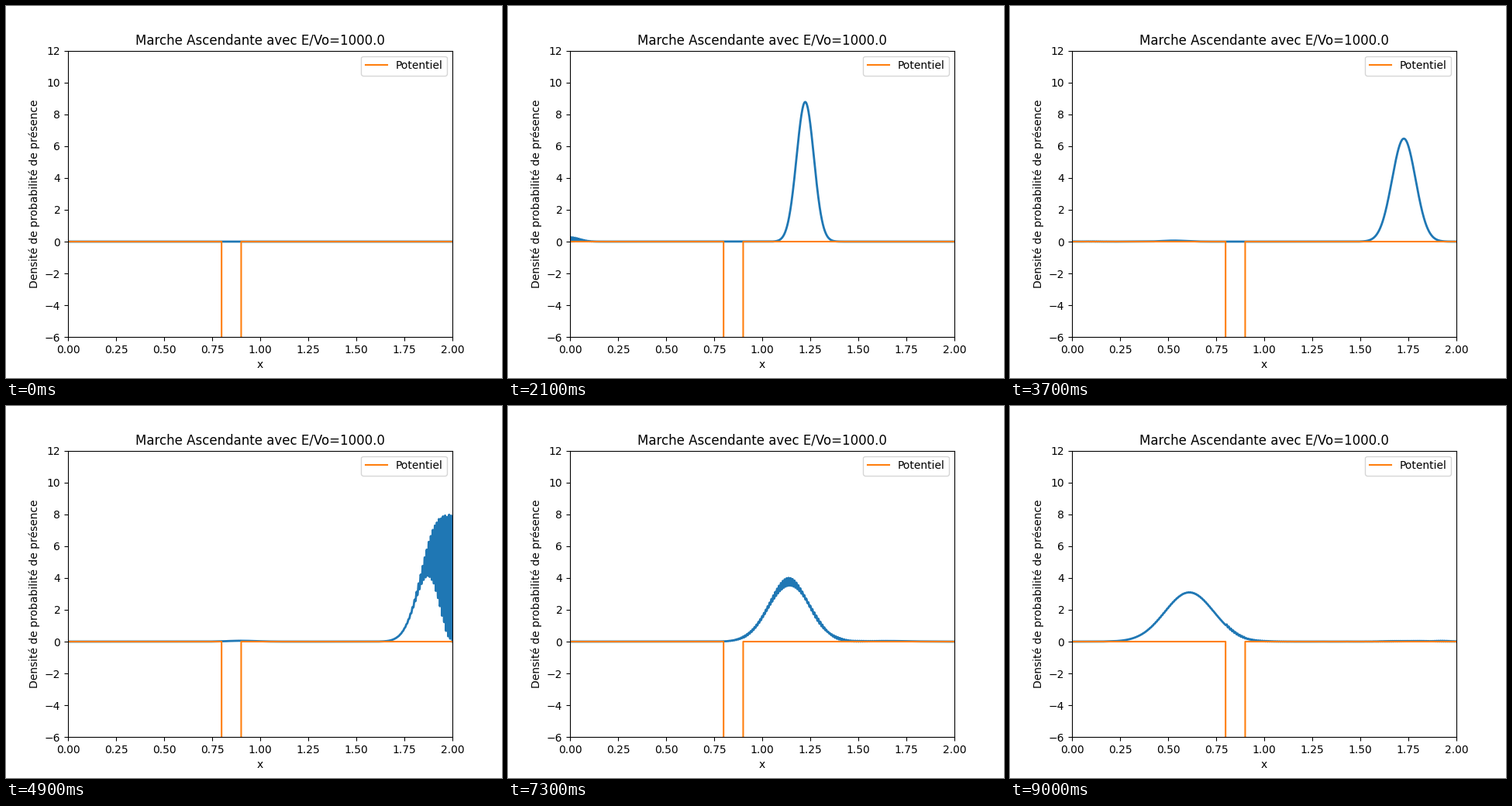
A matplotlib script that plays this animation: 640x480 px, repeating every 9100 ms.

```python
import numpy as np
import matplotlib.pyplot as plt
from matplotlib.animation import FuncAnimation

# Gaussian wave packet crossing a finite well, staggered Re/Im scheme
dx, dt = 1e-3, 1e-7
nx = 2000
s = dt / dx**2
xc, sigma = 0.6, 0.05
v0 = -4000
ratio = 1000.0
k = np.sqrt(2 * abs(ratio * v0))

N_FRAMES = 91
CYCLES = 500  # Re/Im update pairs per frame

x = np.linspace(0, (nx - 1) * dx, nx)
V = np.zeros(nx)
V[(x >= 0.8) & (x <= 0.9)] = v0


def simulate():
    """Return one density row per frame; the first row stays empty."""
    amp = 1 / np.sqrt(sigma * np.sqrt(np.pi))
    psi = amp * np.exp(1j * k * x - (x - xc) ** 2 / (2 * sigma**2))
    re, im = psi.real.copy(), psi.imag.copy()
    diag = 2 * (s + V[1:-1] * dt)
    rho = np.zeros((N_FRAMES, nx))

    def step(f):
        return s * (f[2:] + f[:-2]) - diag * f[1:-1]

    for j in range(1, N_FRAMES):
        for c in range(CYCLES):
            delta = step(re)
            if c == 0:
                old = im[1:-1].copy()
            im[1:-1] += delta
            if c == 0:
                rho[j, 1:-1] = re[1:-1] ** 2 + im[1:-1] * old
            re[1:-1] -= step(im)
    return rho


density = simulate()

fig = plt.figure(figsize=(6.4, 4.8), dpi=100)
ax = fig.add_subplot()
line, = ax.plot([], [], lw=2)
ax.plot(x, V, label="Potentiel")
ax.set_xlim(0, 2)
ax.set_ylim(-6, 12)
ax.set_title(f"Marche Ascendante avec E/Vo={ratio}")
ax.set_xlabel("x")
ax.set_ylabel("Densité de probabilité de présence")
ax.legend(loc="upper right")


def update(j):
    line.set_data(x, density[j])
    return line,


anim = FuncAnimation(fig, update, frames=N_FRAMES, interval=100,
                     repeat=True, repeat_delay=0, blit=False)
plt.show()
```
